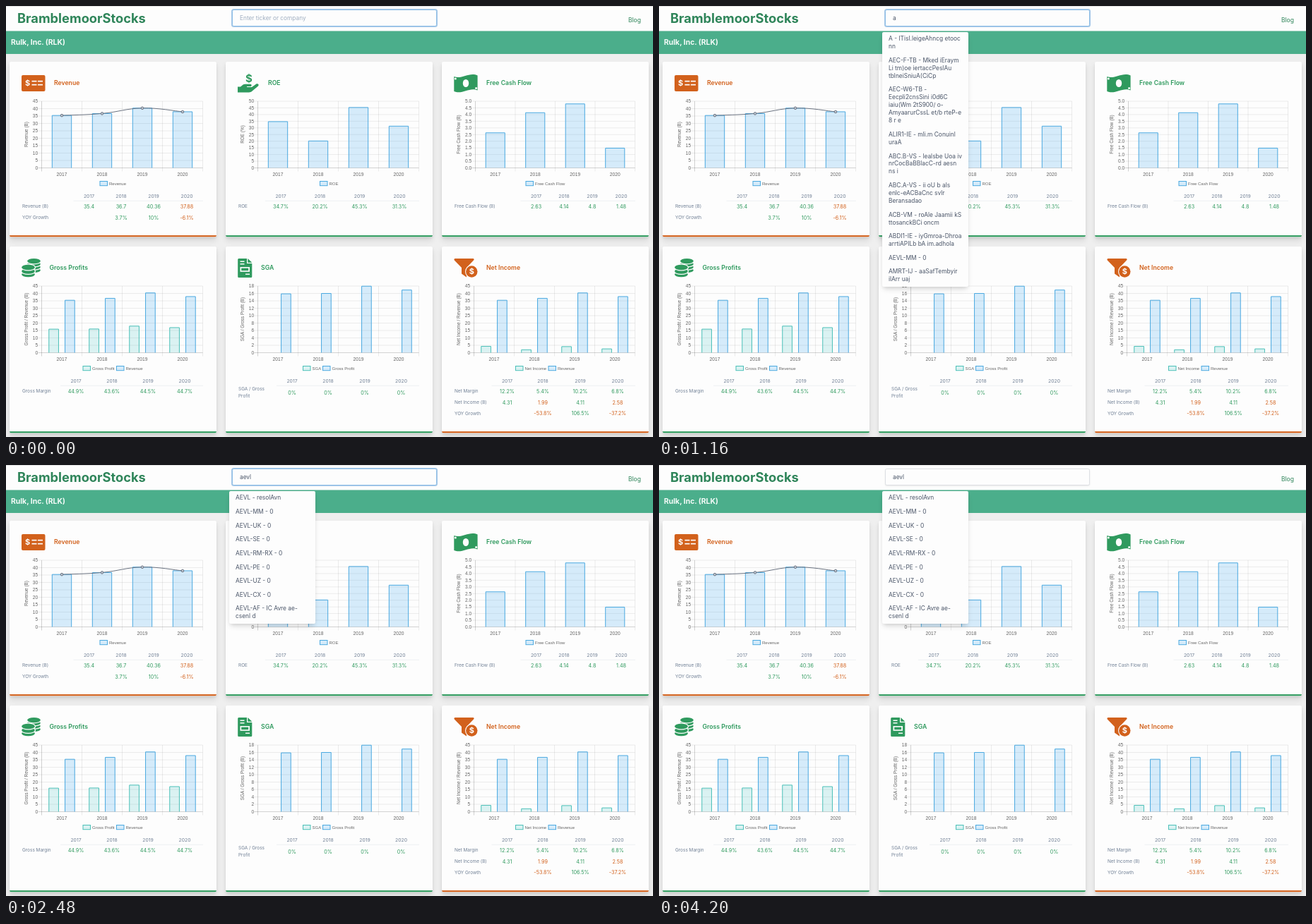
Animation, 916 px wide and 611 px high, one loop 4.22 s. Source, as an HTML page with a canvas:

```html
<!DOCTYPE html>
<html lang="en">
<head>
<meta charset="utf-8">
<title>Stock dashboard</title>
<style>
html, body { margin: 0; width: 100%; height: 100%; overflow: hidden; background: #efefef; }
#stage { position: relative; width: 916px; height: 611px; overflow: hidden; font-family: Inter, sans-serif; }
#stage > * { position: absolute; box-sizing: border-box; }
canvas, svg { left: 0; top: 0; width: 916px; height: 611px; }
.chart { font-family: "Liberation Sans", Arial, sans-serif; fill: #666; }
#field { left: 320px; top: 5px; width: 290px; height: 24px; padding-left: 10px; border: 1px solid #dcdfe3;
  border-radius: 2.5px; background: #fdfdfd; box-shadow: 0 1px 2px rgba(0,0,0,.08);
  font-size: 8.3px; line-height: 22.5px; color: #4a5568; white-space: pre; }
#field.focus { border-color: #90bfe6; box-shadow: 0 0 0 1px #a6c8e8; }
#field.empty { color: #a0aec0; }
#caret { left: 329px; top: 12px; width: 1px; height: 10px; background: #4a5568; }
#menu { left: 316px; top: 37px; width: 122px; background: #fdfdfd; border-radius: 2px; color: #4a5568;
  box-shadow: 0 5px 8px -2px rgba(0,0,0,.14), 0 2px 4px -1px rgba(0,0,0,.08); font-size: 8.4px; }
#menu div { padding: 4.35px 0 4.35px 9px; line-height: 10.95px; white-space: pre; }
</style>
</head>
<body>
<div id="stage">
  <canvas></canvas>
  <svg viewBox="0 0 916 611"></svg>
  <div id="field"></div>
  <div id="caret"></div>
  <div id="menu"></div>
</div>
<script>
const LOOP = 4220;
const GREEN = '#2f9a5e', ORANGE = '#d2611c', PAPER = '#fdfdfd';
const BLUE = ['rgba(54,162,235,.2)', '#4aa9e0'], TEAL = ['rgba(75,192,192,.2)', '#4bc0b8'];
const YEARS = ['2017', '2018', '2019', '2020'];
const revenue = [35.4, 36.7, 40.36, 37.88], gross = [15.9, 16, 17.96, 16.93];

// A leading "!" marks a falling value.
const cards = [
  { x: 5, y: 79, tone: ORANGE, title: 'Revenue', tx: 68, icon: check, axis: 'Revenue (B)', ax: 30.5,
    max: 45, step: 5, left: 50.5, right: 278.5, line: revenue,
    series: [['Revenue', BLUE, revenue, 133]], cols: [117.5, 163, 209, 256],
    rows: [['Revenue (B)', '35.4', '36.7', '40.36', '!37.88'], ['YOY Growth', '', '3.7%', '10%', '!-6.1%']] },
  { x: 311, y: 79, tone: GREEN, title: 'ROE', tx: 371, icon: hand, axis: 'ROE (%)', ax: 337,
    max: 50, step: 5, left: 356.5, right: 584.5,
    series: [['ROE', BLUE, [34.7, 20.2, 45.3, 31.3], 444.5]], cols: [389, 444.5, 500.5, 557],
    rows: [['ROE', '34.7%', '20.2%', '45.3%', '31.3%']] },
  { x: 617, y: 79, tone: GREEN, title: 'Free Cash Flow', tx: 680, icon: bill, axis: 'Free Cash Flow (B)', ax: 643,
    max: 5, step: .5, digits: 1, left: 664.5, right: 890.5,
    series: [['Free Cash Flow', BLUE, [2.63, 4.14, 4.8, 1.48], 736]], cols: [750.5, 790, 830, 871],
    rows: [['Free Cash Flow (B)', '2.63', '4.14', '4.8', '1.48']] },
  { x: 5, y: 341, tone: GREEN, title: 'Gross Profits', tx: 61.5, icon: coins, axis: 'Gross Profit / Revenue (B)', ax: 30.5,
    max: 45, step: 5, left: 50.5, right: 278.5,
    series: [['Gross Profit', TEAL, gross, 109], ['Revenue', BLUE, revenue, 156.5]], cols: [99, 150, 201, 253],
    rows: [['Gross Margin', '44.9%', '43.6%', '44.5%', '44.7%']] },
  { x: 311, y: 341, tone: GREEN, title: 'SGA', tx: 361, icon: sheet, axis: 'SGA / Gross Profit (B)', ax: 337,
    max: 18, step: 2, left: 356.5, right: 584.5,
    series: [['SGA', TEAL, [0, 0, 0, 0], 420.5], ['Gross Profit', BLUE, gross, 448.5]], cols: [405, 456, 508, 559.5],
    rows: [['SGA / Gross|Profit', '0%', '0%', '0%', '0%']] },
  { x: 617, y: 341, tone: ORANGE, title: 'Net Income', tx: 680, icon: funnel, axis: 'Net Income / Revenue (B)', ax: 643,
    max: 45, step: 5, left: 662.5, right: 890.5,
    series: [['Net Income', TEAL, [4.31, 1.99, 4.11, 2.58], 721.5], ['Revenue', BLUE, revenue, 768]], cols: [709.5, 760, 813, 866],
    rows: [['Net Margin', '12.2%', '5.4%', '10.2%', '6.8%'], ['Net Income (B)', '4.31', '!1.99', '4.11', '!2.58'],
           ['YOY Growth', '', '!-53.8%', '106.5%', '!-37.2%']] }
];

const menus = [
  [],
  ['A - ITisl.leigeAhncg etooc\nnn', 'AEC-F-TB - Mked iEraym\nLi tm)oe iertaccPeslAu\ntblneiSniuA(CiCp',
   'AEC-W6-TB -\nEecpli2cnsSini i0d6C\niaiu(Wm 2tS900/ o-\nAmyaarurCssL et/b rteP-e\n8 r e',
   'ALIR1-IE - mli.m Conuinl\nuraA', 'ABC.B-VS - lealsbe Uoa iv\nnrCocBaBBlacC-rd aesn\nns i',
   'ABC.A-VS - ii oU b als\nenlc-eACBaCnc svlr\nBeransadao', 'ACB-VM - roAle Jaamii kS\nttosanckBCi oncm',
   'ABDI1-IE - iyGmroa-Dhroa\narrtiAPILb bA im.adhola', 'AEVL-MM - 0', 'AMRT-IJ - aaSafTembyir\nilArr uaj'],
  ['AEV - cst ncnetrd Pov\nIAauAa', 'AEVL-MM - 0', 'AEVL-UK - 0', 'AEVL-SE - 0', 'AEVL-RM-RX - 0', 'AEVL-PE - 0',
   'AEVL - vAnsolre', 'AEV-MM - 0', 'AH-F-TB - ced ClAnuta. ci\n(Atrb L MPPOHhl\nAeielo.ikt)C'],
  ['AEVL - resolAvn', 'AEVL-MM - 0', 'AEVL-UK - 0', 'AEVL-SE - 0', 'AEVL-RM-RX - 0', 'AEVL-PE - 0',
   'AEVL-UZ - 0', 'AEVL-CX - 0', 'AEVL-AF - IC Avre ae-\ncsenl d']
];

const $ = s => document.querySelector(s);
const canvas = $('canvas'), svg = $('svg'), field = $('#field'), caret = $('#caret'), menu = $('#menu');
const ratio = window.devicePixelRatio || 1;
canvas.width = 916 * ratio;
canvas.height = 611 * ratio;
const c = canvas.getContext('2d');
c.scale(ratio, ratio);

function label(str, x, y, size, attrs = {}) {
  const el = document.createElementNS('http://www.w3.org/2000/svg', 'text');
  Object.entries({ x, y, 'font-size': size, ...attrs }).forEach(([k, v]) => el.setAttribute(k, v));
  el.textContent = str;
  svg.append(el);
}
function box(x, y, w, h, fill) {
  c.fillStyle = fill;
  c.fillRect(x, y, w, h);
}
function shape(d, fill) {
  c.fillStyle = fill;
  c.fill(new Path2D(d));
}
function oval(x, y, rx, ry, fill, edge) {
  c.beginPath();
  c.ellipse(x, y, rx, ry, 0, 0, 7);
  if (edge) { c.strokeStyle = PAPER; c.lineWidth = edge; c.stroke(); }
  c.fillStyle = fill;
  c.fill();
}
function stroke(color, width, ...pts) {
  c.strokeStyle = color;
  c.lineWidth = width;
  c.beginPath();
  pts.forEach(([x, y], i) => i ? c.lineTo(x, y) : c.moveTo(x, y));
  c.stroke();
}
function dollar(x, y, size, fill) {
  c.font = `700 ${size}px Inter, sans-serif`;
  c.textAlign = 'center';
  c.textBaseline = 'middle';
  c.fillStyle = fill;
  c.fillText('$', x, y);
}

function check(tone) {
  c.beginPath();
  c.roundRect(22, 98, 33.5, 23, 2);
  c.fillStyle = tone;
  c.fill();
  dollar(30.5, 109.8, 11, PAPER);
  for (const y of [105.8, 110.8]) for (const x of [36.5, 45]) box(x, y, 7, 1.7, PAPER);
}
function hand(tone) {
  dollar(344, 103, 15, tone);
  shape('M328 114.5h4l3-2.6c2-1.4 4-1.2 6-1.1h5c2.5.3 2 3.2 0 3.3h-5v1h7l6-4.4c2-1.3 5 .5 3 2.8l-9 7.6c-1.4 1-2.3 1.4-4 1.4H328Z', tone);
}
function bill(tone) {
  shape('M634.3 100C645 104.5 656 93 667.6 98.5V119.5C656 114.5 646 126 634.3 121Z', tone);
  oval(651, 109.5, 4.2, 5.5, PAPER);
  oval(636.3, 103, 1.5, 1.5, PAPER);
  oval(665.6, 116.5, 1.5, 1.5, PAPER);
}
function coins(tone) {
  for (const y of [374.5, 370, 365.8, 361.6]) oval(39.5, y, 9.3, 3.6, tone, 2.4);
  for (const y of [380.5, 376, 370.5]) oval(31.5, y, 9.3, 3.8, tone, 2.4);
}
function sheet(tone) {
  shape('M329.5 358H341V365H348.3V383.5Q348.3 385 347 385H329.5Q328.2 385 328.2 383.5V359.5Q328.2 358 329.5 358ZM342.3 358L348.3 363.7H342.3Z', tone);
  box(331.5, 361.5, 6, 1.5, PAPER);
  box(331.5, 365, 6, 1.5, PAPER);
  box(331.5, 370, 13.5, 6.8, PAPER);
  box(333.2, 371.6, 10, 3.6, tone);
  box(339, 379.5, 6, 1.5, PAPER);
}
function funnel(tone) {
  shape('M635.5 358H661.5Q663.5 358.6 662 360.5L652 371V384.5L645 379.5V371L634.8 360.5Q633.6 358.8 635.5 358Z', tone);
  oval(659.3, 376.5, 8.2, 8.2, tone, 2.2);
  dollar(659.3, 376.8, 11, PAPER);
}

function panel({ x, y, tone }) {
  const h = y < 100 ? 248.5 : 264.5;
  for (const [blur, dy, alpha] of [[8, 5, .1], [3, 2, .07]]) {
    c.save();
    c.shadowColor = `rgba(0,0,0,${alpha})`;
    c.shadowBlur = blur * ratio;
    c.shadowOffsetY = dy * ratio;
    c.beginPath();
    c.roundRect(x, y, 293, h, 3);
    c.fillStyle = PAPER;
    c.fill();
    c.restore();
  }
  c.save();
  c.beginPath();
  c.roundRect(x, y, 293, h, 3);
  c.clip();
  box(x, y + h - 2.4, 293, 2.4, tone);
  c.restore();
}

function bar(x, y, w, base, [fill, edge]) {
  box(x, y, w, base - y, fill);
  stroke(edge, 1, [x, base], [x, y], [x + w, y], [x + w, base]);
}

function chart(card) {
  const { y, max, step, left, right, series, line } = card;
  const top = y + 56, base = y + 150.5, cat = (right - left) / 4;
  const yOf = v => base - (base - top) * v / max;
  const mid = i => left + cat * (i + .5);
  const chartText = (s, x, yy, size, anchor, more) => label(s, x, yy, size, { class: 'chart', 'text-anchor': anchor, ...more });

  for (let v = 0; v <= max + .01; v += step) {
    stroke(v ? 'rgba(0,0,0,.1)' : 'rgba(0,0,0,.25)', .7, [left - 5, yOf(v)], [right, yOf(v)]);
    chartText(v.toFixed(card.digits || 0), left - 5.3, yOf(v) + 2.3, 6.6, 'end');
  }
  for (let i = 0; i < 5; i++)
    stroke(i ? 'rgba(0,0,0,.1)' : 'rgba(0,0,0,.25)', .7, [left + cat * i, top], [left + cat * i, base + 5]);
  YEARS.forEach((s, i) => chartText(s, mid(i), y + 161.8, 6.7, 'middle'));
  chartText(card.axis, 0, 0, 6.4, 'middle', { transform: `translate(${card.ax} ${y + 103}) rotate(-90)` });

  const slot = cat * .8 / series.length, w = slot * .6;
  series.forEach(([name, paint, data, lx], k) => {
    const shift = (k - (series.length - 1) / 2) * slot;
    data.forEach((v, i) => v && bar(mid(i) + shift - w / 2, yOf(v), w, base, paint));
    box(lx, y + 169.5, 10.5, 6.2, paint[0]);
    c.strokeStyle = paint[1];
    c.lineWidth = 1;
    c.strokeRect(lx, y + 169.5, 10.5, 6.2);
    chartText(name, lx + 13, y + 174.8, 6, 'start');
  });
  if (line) trend(line.map((v, i) => [mid(i), yOf(v)]));
}

function trend(p) {
  const slope = i => {
    const a = p[Math.max(i - 1, 0)], b = p[Math.min(i + 1, p.length - 1)];
    return [(b[0] - a[0]) * .2, (b[1] - a[1]) * .2];
  };
  c.strokeStyle = '#6a7280';
  c.lineWidth = 1;
  c.beginPath();
  c.moveTo(...p[0]);
  for (let i = 1; i < p.length; i++) {
    const s = slope(i - 1), e = slope(i);
    c.bezierCurveTo(p[i - 1][0] + s[0], p[i - 1][1] + s[1], p[i][0] - e[0], p[i][1] - e[1], ...p[i]);
  }
  c.stroke();
  for (const [x, y] of p) {
    c.beginPath();
    c.arc(x, y, 1.8, 0, 7);
    c.fillStyle = '#c3ccd6';
    c.fill();
    c.stroke();
  }
}

function table({ x, y, cols, rows }) {
  const center = { 'text-anchor': 'middle' };
  YEARS.forEach((s, i) => label(s, cols[i], y + 193.2, 6.8, { ...center, fill: '#718096' }));
  box(cols[0] - 22, y + 196.8, x + 274 - cols[0] + 22, .7, '#e6e9ee');
  rows.forEach(([name, ...vals], r) => {
    const parts = name.split('|'), mid = y + 205.2 + r * 15.8 + (parts.length - 1) * 2;
    parts.forEach((s, i) => label(s, x + 18, mid + 1.8 + (i - (parts.length - 1) / 2) * 9.6, 6.45, { fill: '#718096' }));
    vals.forEach((v, i) => label(v.replace('!', ''), cols[i], mid + 2.6, 7.2, { ...center, fill: v[0] === '!' ? ORANGE : GREEN }));
  });
}

box(0, 0, 916, 611, '#efefef');
box(0, 0, 916, 35.5, PAPER);
box(0, 0, 916, 1, '#e2e2e2');
box(0, 35.5, 916, 32.5, '#4bae8b');
label('BramblemoorStocks', 16, 24, 18.3, { 'font-weight': 700, fill: '#2f855a' });
label('Blog', 881, 22.5, 8.5, { fill: '#2f855a' });
label('Rulk, Inc. (RLK)', 7, 54.6, 10.4, { 'font-weight': 700, fill: '#f4fbf8' });
for (const card of cards) {
  panel(card);
  card.icon(card.tone);
  label(card.title, card.tx, card.y + 33.3, 8.7, { 'font-weight': 600, fill: card.tone });
  chart(card);
  table(card);
}

// Each entry: start time and the value that holds from then on.
const typed = [[0, ''], [920, 'a'], [1400, 'ae'], [1640, 'aev'], [2160, 'aevl']];
const shown = [[0, 0], [1060, 1], [1780, 2], [2300, 3]];
const at = (keys, t) => keys.filter(k => k[0] <= t).pop()[1];
let current = -1;

function frame() {
  const t = performance.now() % LOOP;
  const word = at(typed, t), list = at(shown, t);
  field.textContent = word || 'Enter ticker or company';
  field.className = (word ? '' : 'empty ') + (t < 3900 ? 'focus' : '');
  caret.hidden = !(t >= 500 && t < 920);
  if (list !== current) {
    current = list;
    menu.replaceChildren(...menus[list].map(s => {
      const item = document.createElement('div');
      item.textContent = s;
      return item;
    }));
    menu.hidden = !list;
  }
  requestAnimationFrame(frame);
}
frame();
</script>
</body>
</html>
```
